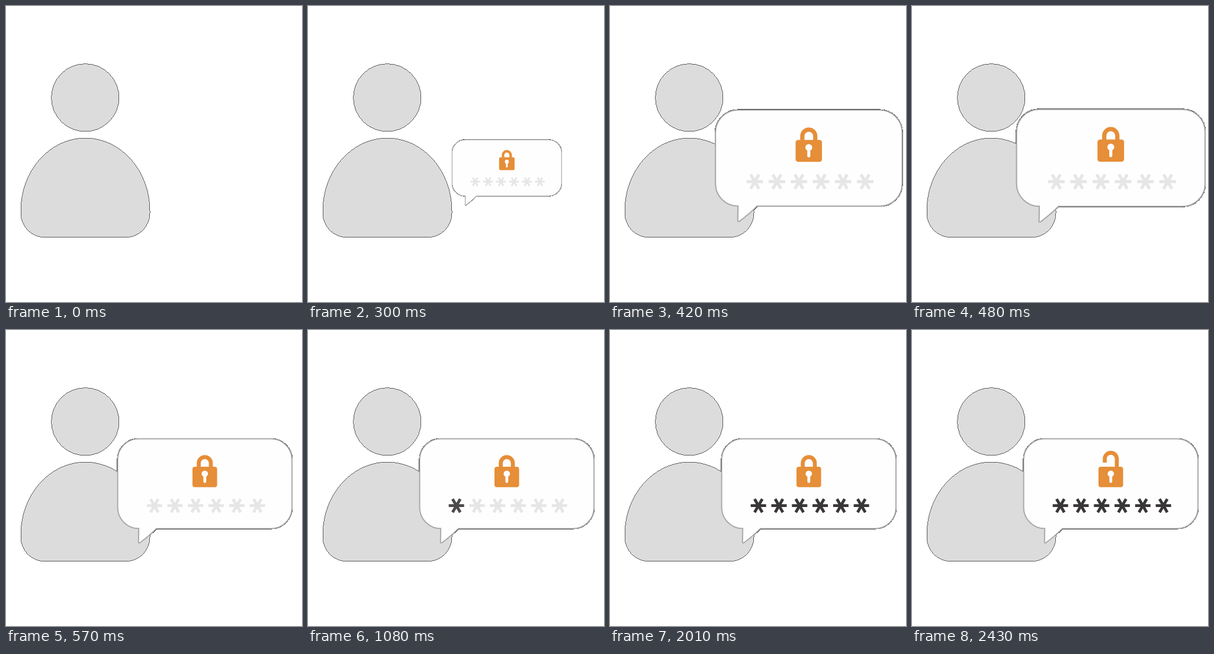
Recreate the animation shown at these times as an HTML page. Size 500 by 500 pixels, loop 4530 ms.

```html
<!DOCTYPE html>
<html lang="en">
<head>
<meta charset="utf-8">
<title>Password unlock</title>
<style>
  html, body { margin: 0; width: 100%; height: 100%; overflow: hidden; background: #fff; }
  svg { display: block; width: 100vw; height: 100vh; }
</style>
</head>
<body>
<svg viewBox="0 0 500 500">
  <defs>
    <path id="outline" d="M224 183.8 H448 A35.3 35.3 0 0 1 483.1 219 V300 A35.3 35.3 0 0 1 448 335.4 H254
      Q244 346 226.5 359.2 Q223.6 361 223.8 357.5 L224.2 335.3 A35.5 35.5 0 0 1 188.6 300 V219 A35.3 35.3 0 0 1 224 183.8 Z"/>
    <path id="star" d="M-13 0 H13 M-6.5 -11.26 L6.5 11.26 M6.5 -11.26 L-6.5 11.26" stroke-width="4.8"/>
  </defs>

  <g class="pop"><use href="#outline" fill="#fff" stroke="#000" stroke-width="2.5" shape-rendering="crispEdges"/></g>

  <g fill="#dcdcdc" stroke="#000" stroke-width="0.6" shape-rendering="crispEdges">
    <circle cx="133.8" cy="154.8" r="57.2"/>
    <path d="M25 346 A109 123 0 0 1 243 346 V350 A40 40.7 0 0 1 203 390.7 H65 A40 40.7 0 0 1 25 350 Z"/>
  </g>

  <g class="pop">
    <use href="#outline" fill="#fefefe" stroke="#aaa" stroke-width="2"/>
    <path id="shackle" fill="none" stroke="#e68e38" stroke-width="6.7"/>
    <rect x="315" y="231" width="41.6" height="34.6" rx="4" fill="#e68e38"/>
    <circle cx="335.8" cy="242.8" r="5.4" fill="#fefefe"/>
    <path d="M335.8 243 V256" stroke="#fefefe" stroke-width="4.8" stroke-linecap="round"/>
    <g id="stars"></g>
  </g>
</svg>
<script>
const LOOP = 4530, STEP = 30;
const TYPED_AT = [1080, 1260, 1410, 1620, 1860, 1980];
const bubbles = document.querySelectorAll('.pop');
const shackle = document.getElementById('shackle');
const row = document.getElementById('stars');

const stars = TYPED_AT.map((_, i) => {
  const star = document.createElementNS('http://www.w3.org/2000/svg', 'use');
  star.setAttribute('href', '#star');
  star.setAttribute('transform', `translate(${250.7 + i * 34.8} 296.7)`);
  return row.appendChild(star);
});

const progress = (t, start, end) => Math.min(1, Math.max(0, (t - start) / (end - start)));
const smooth = p => p * p * (3 - 2 * p);

// Cubic bezier ease (1/6, 1/6, 2/3, 1): steady start, soft stop
function softStop(p) {
  const curve = (u, a, b) => 3 * a * u * (1 - u) ** 2 + 3 * b * u * u * (1 - u) + u ** 3;
  let low = 0, high = 1;
  for (let i = 0; i < 20; i++) {
    const mid = (low + high) / 2;
    if (curve(mid, 1 / 6, 2 / 3) < p) low = mid; else high = mid;
  }
  return curve(high, 1 / 6, 1);
}

function draw(t) {
  const scale = t < 450
    ? 1.1 * softStop(progress(t, 180, 450))
    : 1.1 - 0.1 * smooth(progress(t, 450, 560));
  for (const bubble of bubbles) {
    bubble.setAttribute('transform', `translate(336 297) scale(${scale}) translate(-336 -297)`);
    bubble.setAttribute('visibility', t < 210 ? 'hidden' : 'visible');
  }

  const lift = 7.4 * smooth(progress(t, 2250, 2430));
  shackle.setAttribute('d', `M325.6 ${231.5 - lift} V${224.9 - lift} a10.2 10.2 0 0 1 20.4 0 V233`);

  stars.forEach((star, i) => {
    const age = t - TYPED_AT[i];
    star.setAttribute('stroke', age < 0 ? '#e6e6e6' : age < STEP ? '#4b4949' : '#383636');
  });
}

function tick() {
  const t = performance.now() % LOOP;
  draw(Math.floor(t / STEP) * STEP);
  requestAnimationFrame(tick);
}
tick();
</script>
</body>
</html>
```
